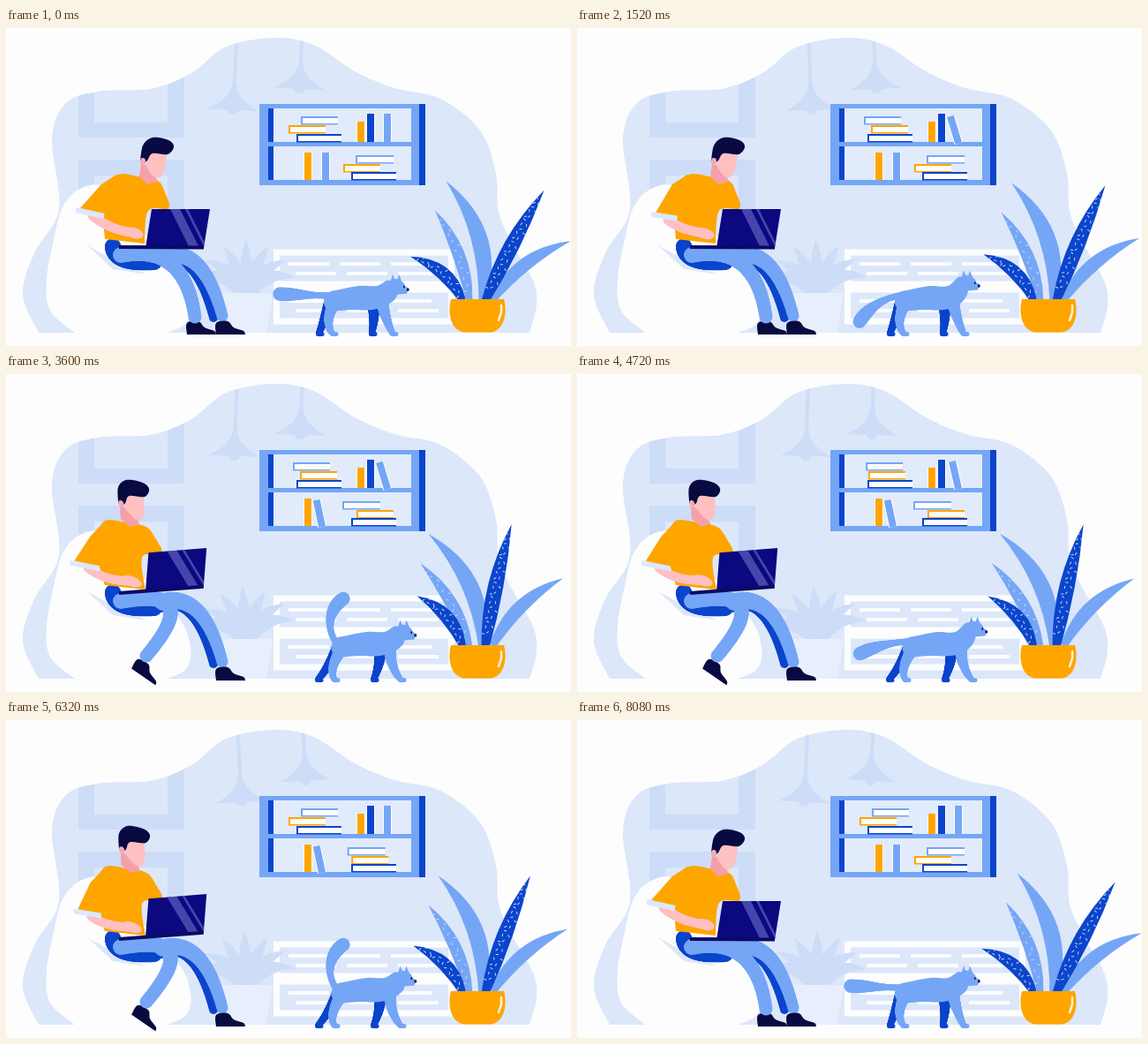
Recreate the animation shown at these times as an HTML page with a canvas. Size 640 by 360 pixels, loop 8160 ms.

```html
<!DOCTYPE html>
<html lang="en">
<head>
<meta charset="utf-8">
<title>Working at home</title>
<style>
html, body { margin: 0; width: 100%; height: 100%; overflow: hidden; background: #fdfdfe; }
canvas { display: block; width: 640px; height: 360px; }
</style>
</head>
<body>
<canvas id="stage" width="640" height="360"></canvas>
<script>
const g = document.getElementById('stage').getContext('2d');
const LOOP = 8160, TAU = Math.PI * 2, DEG = Math.PI / 180;
const WALL = '#dce7fa', SHADE = '#cddcf7', LIGHT = '#75a6f6', BLUE = '#0b45cc';
const AMBER = '#fea500', SKIN = '#ffc0c2', NAVY = '#080a40', WHITE = '#fdfdfe';

const mix = (a, b, k) => a + (b - a) * k;
function ease(t, a, b) {
  const x = Math.min(1, Math.max(0, (t - a) / (b - a)));
  return x * x * (3 - 2 * x);
}
const hold = (t, a, b, c, d) => ease(t, a, b) - ease(t, c, d);
const bump = (x, mid, half) => Math.abs(x - mid) < half ? Math.cos((x - mid) / half * Math.PI / 2) ** 2 : 0;
const wave = (t, turns) => Math.cos(turns * TAU * t / LOOP);

function rect(x, y, w, h, color) {
  g.fillStyle = color;
  g.fillRect(x, y, w, h);
}
function fill(color) {
  g.closePath();
  g.fillStyle = color;
  g.fill();
}
function poly(pts, color) {
  g.beginPath();
  pts.forEach(p => g.lineTo(p[0], p[1]));
  fill(color);
}
// Smooth outline through the points; its ends are joined by a straight edge
function curve(pts, color) {
  const n = pts.length, at = i => pts[Math.min(n - 1, Math.max(0, i))];
  g.beginPath();
  g.moveTo(...pts[0]);
  for (let i = 0; i < n - 1; i++) {
    const a = at(i - 1), b = at(i), c = at(i + 1), d = at(i + 2);
    g.bezierCurveTo(b[0] + (c[0] - a[0]) / 6, b[1] + (c[1] - a[1]) / 6,
      c[0] - (d[0] - b[0]) / 6, c[1] - (d[1] - b[1]) / 6, c[0], c[1]);
  }
  fill(color);
}
function oval(x, y, rx, ry, color, turn = 0) {
  g.beginPath();
  g.ellipse(x, y, rx, ry, turn, 0, TAU);
  fill(color);
}
function line(pts, width, color, cap = 'round') {
  g.beginPath();
  pts.forEach(p => g.lineTo(p[0], p[1]));
  g.lineWidth = width;
  g.lineCap = cap;
  g.strokeStyle = color;
  g.stroke();
}
// Tapering limb: quadratic arc from a past the joint to b
function limb(a, joint, b, w0, w1, color) {
  for (let i = 0; i <= 60; i++) {
    const s = i / 60, [x, y] = [0, 1].map(j => mix(mix(a[j], joint[j], s), mix(joint[j], b[j], s), s));
    oval(x, y, mix(w0, w1, s) / 2, mix(w0, w1, s) / 2, color);
  }
}
function at(x, y, angle, draw) {
  g.save();
  g.translate(x, y);
  g.rotate(angle);
  draw();
  g.restore();
}

// Leaf growing at an angle; bend shifts its middle sideways
function leaf(x, y, angle, len, w, bend, color, marks = 0) {
  at(x, y, angle * DEG, () => {
    g.beginPath();
    g.moveTo(-w * .3, 0);
    g.quadraticCurveTo(2 * bend - w, -len / 2, 0, -len);
    g.quadraticCurveTo(2 * bend + w, -len / 2, w * .3, 0);
    fill(color);
    g.clip();
    for (let i = 0; i < marks; i++) {
      const s = .1 + .84 * i / marks, a = i * 2.4;
      const px = 4 * bend * s * (1 - s) + (i * .618 % 1 - .5) * w * .8 * (1 - s * .4);
      line([[px, -len * s], [px + 2.5 * Math.cos(a), -len * s + 2.5 * Math.sin(a)]], 1, '#c4d9fc');
    }
  });
}

const BLOB = [[37, 345], [19, 302], [32, 255], [60, 205], [52, 125], [68, 85], [105, 72], [165, 69], [210, 51],
  [250, 21], [306, 11], [350, 20], [395, 49], [440, 68], [492, 80], [537, 116], [555, 165], [558, 208],
  [574, 245], [597, 286], [601, 314], [593, 345]];

function lamp(x, cord, swing) {
  at(x, 0, swing * 3 * DEG, () => {
    rect(-2, 0, 4, cord, SHADE);
    oval(0, cord + 25, 7, 7, SHADE);
    g.beginPath();
    g.moveTo(-3, cord - 2);
    g.lineTo(3, cord - 2);
    g.quadraticCurveTo(3, cord + 14, 29, cord + 27);
    g.lineTo(-29, cord + 27);
    g.quadraticCurveTo(-3, cord + 14, -3, cord - 2);
    fill(SHADE);
  });
}

function room(t) {
  curve(BLOB, WALL);
  g.save();
  g.clip();
  rect(82, 50, 120, 74, SHADE);
  rect(100, 50, 83, 57, WALL);
  rect(82, 149, 120, 62, SHADE);
  rect(100, 167, 83, 44, WALL);
  lamp(262, 66, wave(t, 2));
  lamp(336, 42, wave(t, 2));
  g.restore();

  // Drawers with staggered slats
  for (const y of [254, 296]) {
    g.strokeStyle = WHITE;
    g.lineWidth = 7;
    g.strokeRect(306.5, y, 198, 36);
    for (let i = 0; i < 6; i++) rect(320 + i % 3 * 58 + (i > 2 ? 8 : 0), y + (i > 2 ? 22 : 11), 46, 4, WHITE);
  }

  // Faint potted plant
  for (let i = -3; i <= 3; i++)
    leaf(272 + i * 2, 303, i * 23 + (wave(t, 1) - 1) * 2, 64 - Math.abs(i) * 3, 12, -i * 4, SHADE);
  poly([[245, 300], [302, 300], [295, 345], [252, 345]], '#e7effc');
}

function flatBook(x, y, w, color) {
  rect(x, y, w, 9.5, color);
  rect(x + 2, y + 2, w - 2, 6, WHITE);
}
function upright(x, y, h, color, turn = 0) {
  at(x, y, turn * DEG, () => {
    rect(-10, -h, 10, h, WHITE);
    rect(-9, -h, 8, h, color);
  });
}
function shelf(t) {
  const up = hold(t, 500, 1440, 4400, 5400);
  const low = hold(t, 2500, 3400, 5900, 6900);
  const tilt = hold(t, 2500, 3400, 6700, 7900);
  rect(287, 86, 188, 92, LIGHT);
  rect(468, 86, 7, 92, BLUE);
  for (const y of [91, 134]) {
    rect(297, y, 6, 38, BLUE);
    rect(303, y, 156, 38, '#e1ebfc');
  }
  flatBook(mix(334, 325, up), 100, 42, LIGHT);
  flatBook(mix(320, 333, up), 110, 42, AMBER);
  flatBook(329, 120, 51, BLUE);
  upright(407, 129, 23, AMBER);
  upright(418, 129, 32, BLUE);
  upright(437, 129, 32, LIGHT, -17 * up);

  upright(347, 172, 31, AMBER);
  upright(mix(367, 363, tilt), 172, 31, LIGHT, -12 * tilt);
  flatBook(mix(396, 381, low), 144, 43, LIGHT);
  flatBook(mix(382, 397, low), 154, 42, AMBER);
  flatBook(391, 163, 51, BLUE);
}

function plant(t) {
  const k = (1 - wave(t, 1)) / 2;
  leaf(551, 308, 53 - 7 * k, 111, 13, -10, LIGHT);
  leaf(540, 309, -17 - 9 * k, 142, 16, 17, LIGHT);
  leaf(525, 308, -21 - 10 * k, 109, 12, 7, LIGHT, 14);
  leaf(518, 309, -50 + 8 * k, 78, 13, 9, BLUE, 18);
  leaf(543, 309, 28 - 16.5 * k, 142, 15, -3, BLUE, 34);
  g.beginPath();
  g.moveTo(504, 307);
  g.lineTo(564, 307);
  g.bezierCurveTo(569, 326, 562, 344, 548, 344.5);
  g.lineTo(520, 344.5);
  g.bezierCurveTo(506, 344, 499, 326, 504, 307);
  fill(AMBER);
  line([[561, 314], [561, 322], [558, 331]], 2.5, '#fff3d6');
}

function shoe(x, y, turn) {
  at(x, y, turn, () => curve([[0, 14], [0, 1], [13, -1], [20, 6], [31, 10], [33, 14]], NAVY));
}

function legs(k) {
  limb([121, 247], [122, 268], [168, 265], 18, 18, BLUE);
  limb([175, 260], [216, 246], [235, 328], 20, 10, BLUE);
  limb([178, 258], [224, 246], [245, 326], 20, 13, LIGHT);
  shoe(238, 333, 0);
  shoe(mix(205, 150, k), mix(333, 322, k) - 5 * Math.sin(Math.PI * k), .6 * k);
  limb([130, 257], [mix(202, 226, k), mix(243, 240, k)], [mix(214, 159, k), mix(327, 319, k)], 18, 15, LIGHT);
}

function laptop(k) {
  at(128, 248, -.08 * k, () => {
    poly([[37, -43], [103, -43], [96, 1], [30, 1]], '#0b0880');
    g.save();
    g.clip();
    for (const [x, w] of [[58, 11], [75, 3]])
      poly([[x, -43], [x + w, -43], [x + w + 22, 1], [x + 22, 1]], 'rgba(130,130,215,.5)');
    g.restore();
    line([[0, 0], [96, .5]], 4, '#0a0a66', 'butt');
  });
}

function head() {
  poly([[153, 154], [168, 158], [171, 174], [160, 177], [151, 168]], '#f5a0a8');
  curve([[160, 140], [180, 141], [180, 157], [175, 168], [167, 168], [159, 157]], SKIN);
  curve([[152, 150], [155, 133], [163, 125], [173, 124], [186, 128], [190, 135], [183, 143], [166, 142],
    [160, 150], [155, 154]], NAVY);
  oval(155, 151, 3, 4, '#f7aab0');
}

function man(t) {
  const body = hold(t, 2450, 3400, 6200, 7300), step = hold(t, 2450, 3400, 7060, 7950);
  const bob = 3 * (1 - wave(t, 2)), tap = Math.sin(12 * TAU * t / LOOP) * .7;

  curve([[78, 345], [50, 320], [46, 285], [54, 240], [64, 203], [84, 182], [110, 180], [140, 215],
    [195, 275], [209, 310], [204, 334], [182, 345]], WHITE);
  poly([[92, 246], [128, 266], [160, 279], [121, 273]], WALL);
  legs(step);

  // Upper body leans back about the hips
  g.save();
  g.transform(1, 0, .2 * body, 1, -48 * body, 0);
  curve([[112, 239], [111, 205], [124, 168], [150, 168], [172, 173], [180, 186], [184, 204], [161, 207], [157, 244]], AMBER);
  at(-6 * body, -4 * body, 0, head);
  g.restore();

  laptop(step);

  g.save();
  g.transform(1, 0, .2 * body, 1, -48 * body, 7 * body);
  const y = bob * (1 - .4 * body);
  limb([98 + y, 212 + y], [114, 227], [144, 232 + tap - 5 * body], 11, 10, SKIN);
  oval(145, 232 + tap - 5 * body, 11, 6, SKIN, .3);
  poly([[125, 166 - 4 * body], [138, 174], [131, 195], [111 + y / 2, 213 + y / 2], [84 + y, 204 + y], [108, 177]], AMBER);
  line([[79 + y, 206 + y], [111 + y / 2, 213 + y / 2]], 6, '#dbe8fd', 'butt');
  g.restore();
}

function tail(x, y, phase) {
  const lift = 2 + 100 * bump(phase, .31, .2) - 38 * bump(phase, .6, .25);
  const curl = 95 * bump(phase, .35, .2) - 50 * bump(phase, .6, .25);
  for (let i = 0; i <= 60; i++) {
    const s = i / 60, a = (lift + curl * (s - .5)) * DEG, r = mix(3.5, 7.5, ease(s, .2, .9));
    oval(x, y, r, r, LIGHT);
    x -= .92 * Math.cos(a);
    y -= .92 * Math.sin(a);
  }
}

function cat(t) {
  const step = hold(t, 2450, 3400, 7060, 7950), phase = t * 3 / LOOP % 1;
  const shift = 8.5 * step, nod = 3 * Math.cos(TAU * (phase - .15));
  const leg = (hip, knee, paw, reach, color) => {
    const y = 346 - 3 * Math.sin(Math.PI * step), x = paw + reach * step;
    limb([hip + shift, 311], [knee + shift * .6, 333], [x, y], 14, 6, color);
    line([[x, y + .5], [x + 4, y + .5]], 5, color);
  };
  leg(367, 360, 354, -1, BLUE);
  leg(416, 418, 414, 2, BLUE);
  tail(365 + shift, 303, phase);
  leg(372, 360, 370, 2, LIGHT);
  leg(426, 431, 438, 9, LIGHT);

  g.save();
  g.translate(shift, 0);
  curve([[365, 321], [360, 311], [364, 300], [378, 296], [400, 292], [420, 292], [434, 284 + nod],
    [443, 300 + nod], [433, 313], [415, 319], [390, 319]], LIGHT);
  g.translate(0, nod);
  oval(442, 291, 10.5, 8.5, LIGHT, .3);
  poly([[444, 284], [456, 293], [454, 299], [442, 300]], LIGHT);
  for (const x of [435, 442]) poly([[x, 287], [x + 3, 277], [x + 7, 287]], LIGHT);
  rect(450, 290, 1.5, 2.5, NAVY);
  rect(454, 293, 2.5, 3, NAVY);
  g.restore();
}

function frame(now) {
  const t = Math.floor(now % LOOP / 80) * 80;
  rect(0, 0, 640, 360, WHITE);
  for (const draw of [room, shelf, man, plant, cat]) draw(t);
  requestAnimationFrame(frame);
}
frame(0);
</script>
</body>
</html>
```
